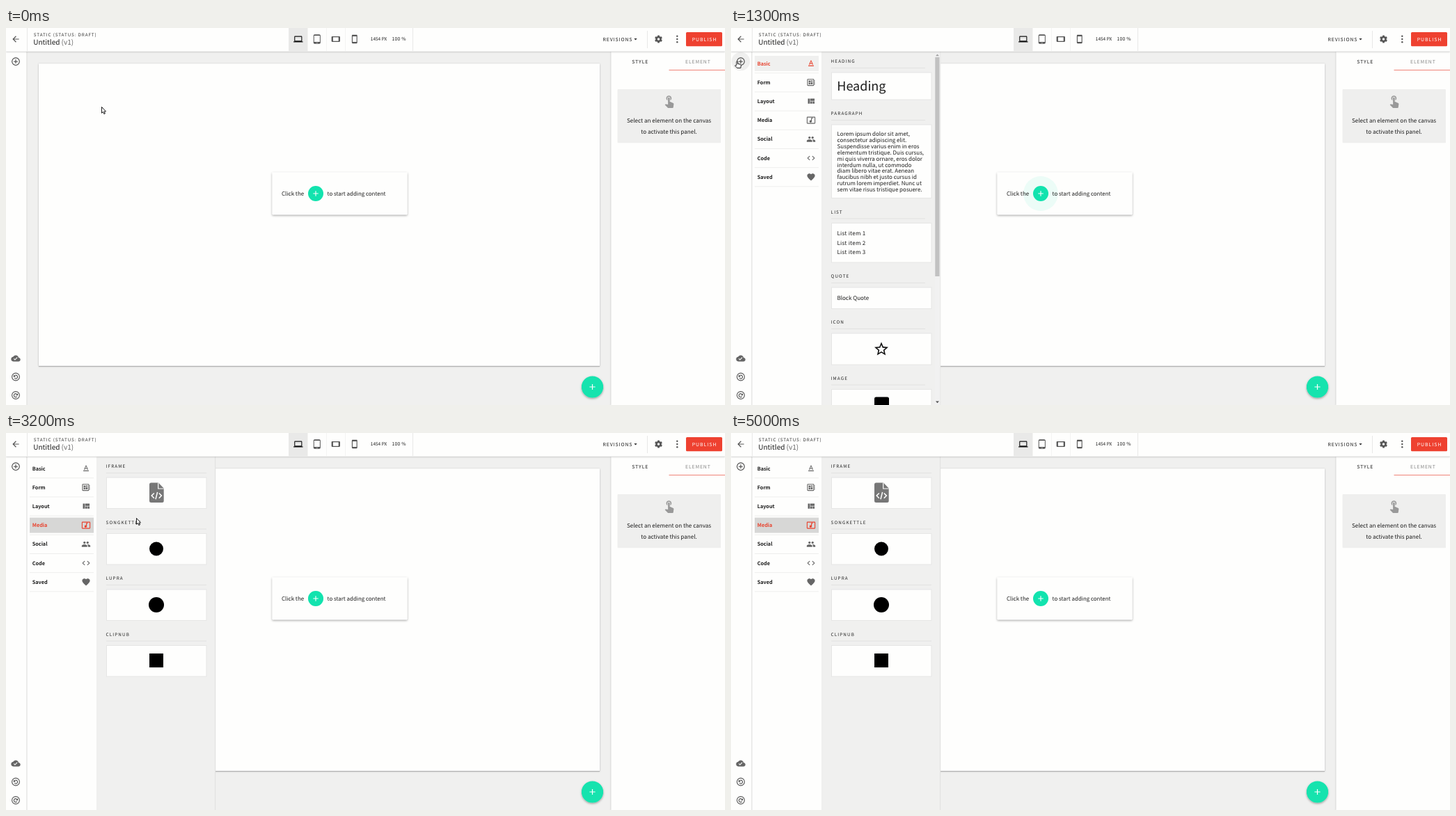
An HTML page for the animation above (5.3 s loop, 1033x542 px).

```html
<!DOCTYPE html>
<html lang="en">
<head>
<meta charset="utf-8">
<title>Page editor</title>
<style>
html, body { margin: 0; width: 100%; height: 100%; overflow: hidden; background: #f0f0ef; }
svg { display: block; width: 1033px; height: 542px; }
text { font-family: "Noto Sans CJK JP", "Noto Sans CJK SC", "Noto Sans CJK", "Open Sans", sans-serif;
  text-rendering: geometricPrecision; white-space: pre; }
</style>
</head>
<body>
<svg id="stage" viewBox="0 0 1033 542"></svg>
<script>
const LOOP = 5300, STEP = 100;
const RED = '#ee4130', TEAL = '#12e3ae', INK = '#1c1c1c', GREY = '#666', WHITE = '#fefefd', BACK = '#f0f0ef';

// Drawing helpers; text is placed by the middle of its capitals.
const rect = (x, y, w, h, fill, more = '') =>
  `<rect x="${x}" y="${y}" width="${w}" height="${h}" fill="${fill}" ${more}/>`;
const disc = (x, y, r, fill, more = '') => `<circle cx="${x}" cy="${y}" r="${r}" fill="${fill}" ${more}/>`;
const line = (d, color, width = 1, more = '') =>
  `<path d="${d}" fill="none" stroke="${color}" stroke-width="${width}" ${more}/>`;
const text = (x, mid, str, size, { fill = INK, gap = 0, weight = 400, anchor = 'start', id = '' } = {}) =>
  `<text id="${id}" x="${x}" y="${mid + 0.367 * size}" font-size="${size}" fill="${fill}" ` +
  `letter-spacing="${gap}" font-weight="${weight}" text-anchor="${anchor}">${str}</text>`;
const icon = (d, x, y, scale = 0.56, fill = GREY, id = '') =>
  `<path id="${id}" d="${d}" fill="${fill}" fill-rule="evenodd" ` +
  `transform="translate(${x} ${y}) scale(${scale}) translate(-12 -12)"/>`;
const plus = (x, y, r, color, width) => line(`M${x - r} ${y}h${2 * r}M${x} ${y - r}v${2 * r}`, color, width);
const group = (id, body, more = '') => `<g id="${id}" ${more}>${body}</g>`;

const ICON = {
  back: 'M20 11H7.83l5.59-5.59L12 4l-8 8 8 8 1.41-1.41L7.83 13H20z',
  laptop: 'M20 18c1.1 0 2-.9 2-2V6c0-1.1-.9-2-2-2H4c-1.1 0-2 .9-2 2v10c0 1.1.9 2 2 2H0v2h24v-2zM4 6h16v10H4z',
  tablet: 'M18 0H6C4.34 0 3 1.34 3 3v18c0 1.66 1.34 3 3 3h12c1.66 0 3-1.34 3-3V3c0-1.66-1.34-3-3-3zm-4 22h-4v-1h4zm5.25-3H4.75V3h14.5z',
  wide: 'M1 7v10c0 1.1.9 2 2 2h18c1.1 0 2-.9 2-2V7c0-1.1-.9-2-2-2H3c-1.1 0-2 .9-2 2zM19 7v10H5V7z',
  phone: 'M17 1H7c-1.1 0-2 .9-2 2v18c0 1.1.9 2 2 2h10c1.1 0 2-.9 2-2V3c0-1.1-.9-2-2-2zM17 19H7V5h10z',
  cloud: 'M19.35 10.04C18.67 6.59 15.64 4 12 4 9.11 4 6.6 5.64 5.35 8.04 2.34 8.36 0 10.91 0 14c0 3.31 2.69 6 6 6h13c2.76 0 5-2.24 5-5 0-2.64-2.05-4.78-4.65-4.96zM10 17l-3.5-3.5 1.41-1.41L10 14.17 15.18 9l1.41 1.41z',
  touch: 'M9 11.24V7.5C9 6.12 10.12 5 11.5 5S14 6.12 14 7.5v3.74c1.21-.81 2-2.18 2-3.74C16 5 14 3 11.5 3S7 5 7 7.5c0 1.56.79 2.93 2 3.74zM18.84 15.87l-4.54-2.26c-.17-.07-.35-.11-.54-.11H13v-6c0-.83-.67-1.5-1.5-1.5S10 6.67 10 7.5v10.74l-3.43-.72c-.4-.06-.75 0-1.03.3l-.79.8 4.94 4.94c.27.27.65.44 1.06.44h6.79c.75 0 1.33-.55 1.44-1.28l.75-5.27c.06-.7-.3-1.3-.89-1.58z',
  star: 'M22 9.24l-7.19-.62L12 2 9.19 8.63 2 9.24l5.46 4.73L5.82 21 12 17.27 18.18 21l-1.63-7.03zM12 15.4l-3.76 2.27 1-4.28-3.32-2.88 4.38-.38L12 6.1l1.71 4.04 4.38.38-3.32 2.88 1 4.28z',
  Basic: 'M5 17v2h14v-2zM9.5 12.8h5l.9 2.2h2.1L12.75 4h-1.5L6.5 15h2.1zM12 5.98L13.87 11h-3.74z',
  Form: 'M22 9V7h-2V5c0-1.1-.9-2-2-2H4c-1.1 0-2 .9-2 2v14c0 1.1.9 2 2 2h14c1.1 0 2-.9 2-2v-2h2v-2h-2v-2h2v-2h-2V9zM18 19H4V5h14zM6 13h5v4H6zM12 7h4v3h-4zM6 7h5v5H6zM12 11h4v6h-4z',
  Layout: 'M10 18h5v-6h-5zM4 18h5V5H4zM16 18h5v-6h-5zM10 5v6h11V5z',
  Media: 'M21 3H3c-1.1 0-2 .9-2 2v14c0 1.1.9 2 2 2h18c1.1 0 2-.9 2-2V5c0-1.1-.9-2-2-2zM21 19H3V5h18zM8 15c0-1.66 1.34-3 3-3 .35 0 .69.07 1 .18V6h5v2h-3v7c0 1.65-1.35 3-3 3s-3-1.34-3-3z',
  Social: 'M16 11a3 3 0 1 0 0-6 3 3 0 0 0 0 6zM8 11a3 3 0 1 0 0-6 3 3 0 0 0 0 6zM8 13c-2.33 0-7 1.17-7 3.5V19h14v-2.5C15 14.17 10.33 13 8 13zM16 13l-.97.05C16.2 13.9 17 15 17 16.5V19h6v-2.5c0-2.33-4.67-3.5-7-3.5z',
  Code: 'M9.4 16.6L4.8 12l4.6-4.6L8 6l-6 6 6 6zM14.6 16.6l4.6-4.6-4.6-4.6L16 6l6 6-6 6z',
  Saved: 'M12 21.35l-1.45-1.32C5.4 15.36 2 12.28 2 8.5 2 5.42 4.42 3 7.5 3c1.74 0 3.41.81 4.5 2.09C13.09 3.81 14.76 3 16.5 3 19.58 3 22 5.42 22 8.5c0 3.78-3.4 6.86-8.55 11.54z'
};

const MENU = ['Basic', 'Form', 'Layout', 'Media', 'Social', 'Code', 'Saved'];
const rowY = i => 51 + 27.2 * i;

const LOREM = ['Lorem ipsum dolor sit amet,', 'consectetur adipiscing elit.', 'Suspendisse varius enim in eros',
  'elementum tristique. Duis cursus,', 'mi quis viverra ornare, eros dolor', 'interdum nulla, ut commodo',
  'diam libero vitae erat. Aenean', 'faucibus nibh et justo cursus id', 'rutrum lorem imperdiet. Nunc ut',
  'sem vitae risus tristique posuere.'];

const section = (mid, name, height, ruleEnd) =>
  text(143.6, mid, name, 6.3, { gap: 1.12, fill: '#222' }) +
  line(`M144 ${mid + 9.5}H${ruleEnd}`, '#e2e2e1') +
  rect(144.5, mid + 16, 143.5, height, WHITE, 'stroke="#e6e6e5"');

function basicList() {
  const parts = [['HEADING', 48, 39], ['PARAGRAPH', 123, 105.5], ['LIST', 264.5, 56.5],
    ['QUOTE', 357, 30.5], ['ICON', 423, 45], ['IMAGE', 503.5, 45]];
  return parts.map(([name, mid, h]) => section(mid, name, h, 279)).join('') +
    text(152.3, 83.2, 'Heading', 18) +
    LOREM.map((s, i) => text(152.6, 152.2 + 8.88 * i, s, 7.97)).join('') +
    [1, 2, 3].map(n => text(152.4, 282.2 + 13.3 * n, 'List item ' + n, 8.05, { gap: 0.25 })).join('') +
    text(152.4, 388, 'Block Quote', 8.05) +
    icon(ICON.star, 216, 461.5, 1, '#111') +
    rect(206, 530.5, 21, 21, '#000', 'rx="2.5"') +
    rect(293, 34, 7.5, 508, '#f1f1f1') + rect(293.3, 42, 6.2, 315, '#c1c1c1') +
    '<path d="M294 40.2h5l-2.5-2.8z" fill="#a3a3a3"/><path d="M294 536.4h5l-2.5 2.8z" fill="#505050"/>';
}

const fileIcon = '<path d="M208.5 71.5H219l7.7 8V97.500q0 2.500-2.500 2.500H208.500q-2.500 0-2.500-2.500V74q0-2.500 2.500-2.500z" fill="#777"/>' +
  line('M218.7 71.5V80h8', WHITE, 1.2) +
  line('M212.8 86.500l-3.600 3.600 3.600 3.600M219.800 86.500l3.600 3.600-3.600 3.600M217.600 85l-2.600 10.200', WHITE, 1.5);

const mediaList = () =>
  ['IFRAME', 'SONGKETTLE', 'LUPRA', 'CLIPNUB'].map((name, i) => section(48 + 80.5 * i, name, 44.5, 288)).join('') +
  fileIcon + disc(216, 166.5, 10, '#000') + disc(216, 247, 11, '#000') + rect(206, 317, 20, 20, '#000') +
  group('hover',
    rect(131, 57, 169, 57, '#f6f6f5') + rect(144.5, 64, 143.5, 44.5, WHITE) +
    group('', fileIcon, 'opacity=".5"') +
    rect(171, 72.8, 89, 27, '#14dfad', 'rx="13.5" opacity=".95" filter="url(#lift)"') +
    plus(184, 86.3, 3.6, '#fff', 1.2) +
    text(197, 86.3, 'DRAG TO ADD', 6.9, { gap: 0.82, fill: '#fff' }));

const menu = () => rect(30, 34, 101, 508, WHITE) + MENU.map((name, i) =>
  rect(34, rowY(i) - 11, 92, 22, 'none', `id="row${i}"`) +
  line(`M34 ${rowY(i) + 13.7}H126`, '#eeeeed') +
  text(37.7, rowY(i), name, 7.3, { weight: 700, id: 'name' + i }) +
  icon(ICON[name], 115, rowY(i), 0.56, GREY, 'icon' + i)).join('');

const turn = (y, flip) => `<g transform="translate(14 ${y}) scale(${flip} 1)">` +
  disc(0, 0, 5.4, 'none', 'stroke="#555" stroke-width="1.1"') +
  line('M-2 -1.200A2.500 2.500 0 1 1 -1.800 1.800', '#555', 1.1) +
  '<path d="M-3.200 -2.900V.2H0z" fill="#555"/></g>';

const sidebar = () => rect(0, 34, 29.5, 508, WHITE) + line('M30 34V542', '#dededd') +
  disc(14, 48, 13.3, '#000', 'id="halo"') +
  disc(14, 48.2, 5.3, 'none', 'stroke="#444" stroke-width="1.1"') + plus(14, 48.2, 2.9, '#444', 1.1) +
  icon(ICON.cloud, 14, 475) + turn(501.5, 1) + turn(528, -1);

const gear = () => disc(937.5, 16, 3, 'none', 'stroke="#555" stroke-width="2.5"') +
  [0, 60, 120].map(a => `<g transform="rotate(${a} 937.5 16)">` +
    rect(936.1, 10.6, 2.8, 2.6, '#555') + rect(936.1, 18.8, 2.8, 2.6, '#555') + '</g>').join('');

function topBar() {
  const devices = ['laptop', 'tablet', 'wide', 'phone'];
  return rect(0, 0, 1033, 33.6, WHITE, 'filter="url(#edge)"') + icon(ICON.back, 14, 16, 0.58, '#555') +
    line('M30.500 0V33M584.500 0V33M921.500 4V29', '#e8e8e7') + line('M460.500 0V33M487.500 0V33', '#f4f4f3') +
    text(39.8, 10, 'STATIC (STATUS: DRAFT)', 6.3, { gap: 0.9, fill: '#333' }) +
    text(39.2, 20.8, 'Untitled <tspan fill="#666">(v1)</tspan>', 10) +
    rect(406, 0, 27.5, 33.4, '#e9e9e8') +
    devices.map((d, i) => icon(ICON[d], 419.8 + 27 * i, 16, 0.56, i ? '#555' : '#111')).join('') +
    text(523.8, 16, '1454 PX', 6.5) + text(554.6, 16, '100 %', 6.8, { gap: 0.2 }) +
    text(857.5, 16.2, 'REVISIONS', 6.9, { gap: 0.9 }) + '<path d="M902.300 15h4.400l-2.200 2.600z" fill="#333"/>' +
    gear() + [11.8, 16, 20.2].map(y => disc(964.3, y, 1.2, '#555')).join('') +
    rect(977, 6, 52, 20.3, RED, 'rx="1.5"') + text(985.7, 16.2, 'PUBLISH', 6.9, { gap: 1, fill: '#fff' });
}

const rightPanel = () => rect(869.5, 34, 164, 508, WHITE, 'filter="url(#edge)"') +
  text(899.2, 48, 'STYLE', 6.9, { gap: 0.95 }) + text(976, 48, 'ELEMENT', 6.9, { gap: 0.87, fill: '#888' }) +
  rect(952.5, 60, 80.5, 1, '#ef8478') + rect(878.5, 88, 148.5, 77.3, '#efefee', 'rx="1"') +
  icon(ICON.touch, 952.8, 104.8, 0.85, '#999') +
  text(952.5, 133.5, 'Select an element on the canvas', 8.1, { anchor: 'middle' }) +
  text(952.5, 149, 'to activate this panel.', 8.1, { anchor: 'middle' });

const canvasArea = () => rect(47, 51.3, 806, 434.7, WHITE, 'filter="url(#edge)"') +
  line('M47 486.300H853', '#a9a9a8', 0.9) +
  rect(382.5, 207.5, 194, 60.8, WHITE, 'rx="1" filter="url(#lift)"') +
  disc(445, 238, 11, TEAL, 'id="pulse"') + disc(445, 238, 11, TEAL) + plus(445, 238, 3.7, '#fff', 1.1) +
  text(396, 238.3, 'Click the', 8) + text(461.6, 238.3, 'to start adding content', 7.9) +
  disc(842.5, 516, 15.6, TEAL, 'filter="url(#lift)"') + plus(842.5, 516, 4.1, '#fff', 1.2);

const shadow = (id, dy, blur, alpha) => `<filter id="${id}" x="-20%" y="-30%" width="140%" height="170%">` +
  `<feDropShadow dx="0" dy="${dy}" stdDeviation="${blur}" flood-color="#000" flood-opacity="${alpha}"/></filter>`;

const outline = 'fill="#fff" stroke="#111" stroke-width=".95" stroke-linejoin="round"';
document.getElementById('stage').innerHTML =
  `<defs>${shadow('edge', 0.5, 0.8, 0.28)}${shadow('lift', 1.3, 1.5, 0.38)}</defs>` +
  rect(0, 0, 1033, 542, BACK) + canvasArea() +
  group('drawer', rect(30, 34, 271, 508, BACK) + line('M300.700 34V542', '#dfdfde') +
    group('basic', basicList()) + group('media', mediaList()) + menu() + line('M130.700 34V542', '#ececeb')) +
  sidebar() + rightPanel() + topBar() +
  `<path id="arrow" d="M.5 .5V9.300L2.500 7.500 3.900 10.700 5.400 10 4 7H6.500z" ${outline}/>` +
  `<path id="hand" d="M3 6V1.200a.9.9 0 0 1 1.800 0V4l3.600.7q1.200.3 1 1.500l-.5 3.800H4L.6 6.800q.6-1 1.600-.4z" ${outline}/>`;

const $ = id => document.getElementById(id);
const show = (id, on) => $(id).setAttribute('display', on ? 'inline' : 'none');
const clamp = u => Math.max(0, Math.min(1, u));
const span = (t, a, b) => clamp((t - a) / (b - a));
const easeInOut = u => u < 0.5 ? 4 * u ** 3 : 1 - 4 * (1 - u) ** 3;

// Pointer track: time, x, y.
const TRACK = [[0, 137, 113], [200, 137, 113], [400, 95, 88], [600, 30, 48], [700, 8, 41], [800, 5, 47.5],
  [1500, 5, 47.5], [1700, 55, 59], [1800, 92, 66], [1900, 103, 68], [2200, 103, 68], [2300, 84, 80],
  [2400, 59, 100], [2500, 75, 120], [2600, 87, 128], [2900, 87, 128], [3100, 165, 124], [3200, 187, 122],
  [3300, 187, 122], [3600, 205, 98], [3800, 213, 84], [3900, 213.5, 81.5], [4300, 214.5, 82.5],
  [4400, 214.5, 82.5], [4500, 200, 66], [4700, 101, 16]];

function pointerAt(t) {
  const i = TRACK.findIndex(k => k[0] > t);
  if (i < 0) return TRACK[TRACK.length - 1].slice(1);
  const [a, b] = [TRACK[i - 1], TRACK[i]], u = span(t, a[0], b[0]);
  return [a[1] + (b[1] - a[1]) * u, a[2] + (b[2] - a[2]) * u];
}

function drawPulse(t) {
  const u = span((t - 200 + 3000) % 3000, 0, 1500);
  $('pulse').setAttribute('r', 11 + 15 * (1 - (1 - u) ** 2));
  $('pulse').setAttribute('opacity', 0.28 * (1 - u));
}

function drawPointer(t, [x, y]) {
  const hand = (t >= 800 && t < 1600) || (t >= 1700 && t < 3000) || (t >= 3600 && t < 4500);
  const shown = t < 4800;
  show('hand', shown && hand);
  show('arrow', shown && !hand);
  $(hand ? 'hand' : 'arrow').setAttribute('transform', `translate(${x} ${y})`);
}

function drawMenu(t, [x, y]) {
  const active = t < 2800 ? 0 : 3;
  MENU.forEach((_, i) => {
    const on = i === active;
    const over = t >= 1300 && t < 4800 && x > 32 && x < 126 && Math.abs(y + 3 - rowY(i)) < 12;
    $('row' + i).setAttribute('fill', on ? (i ? '#d7d7d6' : '#f0f0ef') : over ? '#f4f4f3' : 'none');
    $('name' + i).setAttribute('fill', on ? '#e8432f' : INK);
    $('icon' + i).setAttribute('fill', on ? '#e8432f' : GREY);
  });
}

function draw(t) {
  const at = pointerAt(t);
  drawPulse(t);
  drawPointer(t, at);
  drawMenu(t, at);
  show('drawer', t > 1000);
  $('drawer').setAttribute('transform', `translate(${-271 * (1 - easeInOut(span(t, 1007, 1300)))} 0)`);
  show('basic', t < 2900);
  show('media', t >= 2900);
  $('hover').setAttribute('opacity', Math.min(span(t, 3500, 3800), 1 - span(t, 4400, 4700)));
  const press = t < 900 ? 0 : t < 1000 ? 0.06 : t < 2900 ? 0.15 - 0.09 * span(t, 1100, 1300) : 0;
  $('halo').setAttribute('opacity', press);
}

const start = performance.now();
function tick() {
  const t = (performance.now() - start) % LOOP;
  draw(Math.floor(t / STEP) * STEP);
  requestAnimationFrame(tick);
}
tick();
</script>
</body>
</html>
```
